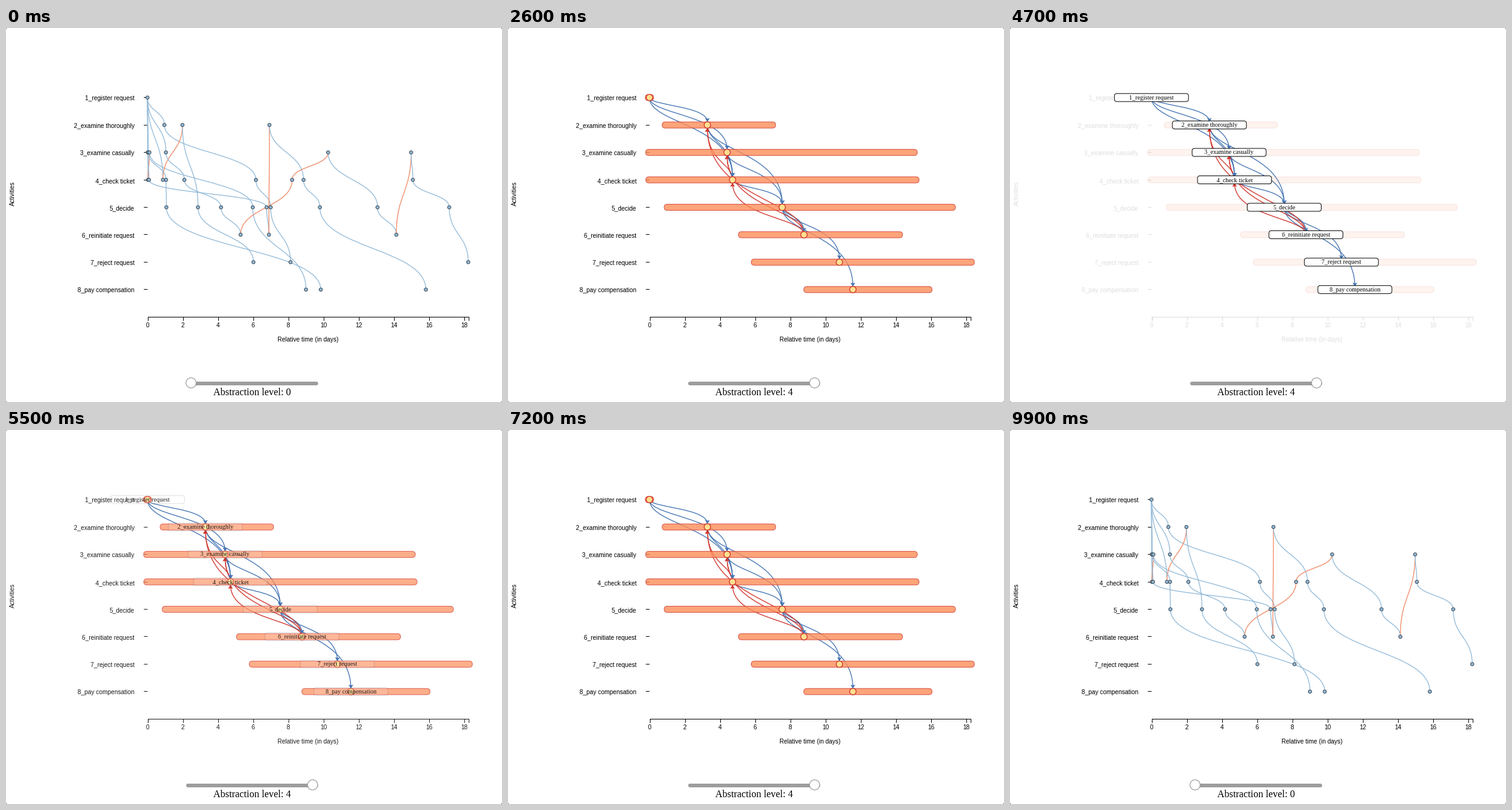
Animation of 804x606 px, one loop 10000 ms. Source, as a matplotlib script:

```python
import numpy as np
import matplotlib.pyplot as plt
from matplotlib.animation import FuncAnimation
from matplotlib.patches import Circle, FancyBboxPatch, PathPatch, Polygon
from matplotlib.path import Path

W, H, DPI = 804, 606, 100
PX = 72 / DPI
STEP, LOOP = 100, 10000

BLUE, RED = "#4575b4", "#d0342b"
ORANGE, YELLOW = "#fc8d59", "#fee090"

NAMES = ["1_register request", "2_examine thoroughly", "3_examine casually",
         "4_check ticket", "5_decide", "6_reinitiate request",
         "7_reject request", "8_pay compensation"]

# Each case is a list of (activity, day) events.
CASES = [
    [(1, 0), (2, .96), (4, 6.17), (5, 7.01), (7, 8.14)],
    [(1, 0), (4, .03), (3, .11), (5, 5.99), (8, 9.02)],
    [(1, 0), (3, .02), (4, .085), (5, 6.78), (6, 6.91), (2, 6.94),
     (4, 8.88), (5, 9.81), (8, 15.84)],
    [(1, 0), (4, .88), (2, 1.99), (5, 2.875), (7, 6.03)],
    [(1, 0), (3, 1.05), (4, 2.1), (5, 4.185), (6, 5.3), (4, 8.23), (3, 10.28),
     (5, 13.09), (6, 14.16), (3, 15.0), (4, 15.1), (5, 17.17), (7, 18.25)],
    [(1, 0), (3, .044), (4, 1.056), (5, 1.076), (8, 9.86)],
]

# Per level: activity -> range of days that is merged into one node.
MERGED = [
    {},
    {3: (0, .5), 4: (0, 1.5), 5: (5.5, 7.5)},
    {1: (0, 0), 2: (0, 3), 3: (0, 2), 4: (0, 9), 5: (0, 10), 6: (0, 8), 7: (0, 9)},
    {1: (0, 0), 2: (0, 3), 3: (0, 11), 4: (0, 20), 5: (0, 20), 6: (0, 8),
     7: (0, 9), 8: (0, 10)},
    {a: (0, 20) for a in range(1, 9)},
]

# Start time in ms of each abstraction level.
LEVEL_TIMES = [(0, 0), (600, 1), (1300, 2), (1900, 3), (2600, 4),
               (7500, 3), (8100, 2), (8800, 1), (9400, 0)]

# The small surplus keeps the pixel size from being rounded down.
fig = plt.figure(figsize=((W + .01) / DPI, (H + .01) / DPI), dpi=DPI,
                 facecolor="white")
ax = fig.add_axes([0, 0, 1, 1])
ax.set_xlim(0, W)
ax.set_ylim(H, 0)
ax.axis("off")


def day_x(day):
    return 229.3 + 28.49 * day


def row_y(activity):
    return 112.7 + 44.45 * (activity - 1)


def ease(u):
    u = min(max(u, 0), 1)
    return 4 * u ** 3 if u < .5 else 1 - 4 * (1 - u) ** 3


def label(x, y, text, size=10, font="Liberation Sans", ha="center", **kw):
    return ax.text(x, y, text, fontsize=size * PX, family=font, ha=ha,
                   va=kw.pop("va", "baseline"), color="black", **kw)


def line(xs, ys):
    return ax.plot(xs, ys, color="black", lw=PX, zorder=1,
                   solid_capstyle="butt")[0]


def rounded(x0, y0, x1, y1, r, **kw):
    return ax.add_patch(FancyBboxPatch(
        (x0, y0), x1 - x0, y1 - y0,
        boxstyle=f"round,pad=0,rounding_size={r}", **kw))


def curve(p, q, bend, color, lw, alpha=1):
    (x0, y0), (x1, y1) = p, q
    ym = y0 + (y1 - y0) * bend
    path = Path([(x0, y0), (x0, ym), (x1, ym), (x1, y1)],
                [Path.MOVETO] + [Path.CURVE4] * 3)
    return ax.add_patch(PathPatch(path, fc="none", ec=color, lw=lw * PX,
                                  alpha=alpha, zorder=2))


def arrow(p, q, color):
    way = 1 if q[1] > p[1] else -1
    x, tip = q[0], q[1] - way * 5
    base = tip - way * 6
    head = Polygon([(x, tip), (x - 3.8, base), (x, base + way * .8),
                    (x + 3.8, base)], fc=color, ec="none", zorder=2.5)
    return [curve(p, (x, tip), 1 / 3, color, 1.3), ax.add_patch(head)]


def dot(p, r, fill, edge, lw, alpha=1):
    return ax.add_patch(Circle(p, r, fc=fill, ec=edge, lw=lw * PX,
                               alpha=alpha, zorder=4))


def build_level(level):
    """Draw one abstraction level; return (all artists, bars, merged nodes)."""
    ranges = MERGED[level]
    fade = level >= 2
    groups, singles, edges = {}, set(), {}
    for case in CASES:
        for act, day in case:
            lo, hi = ranges.get(act, (1, 0))
            if lo <= day <= hi:
                groups.setdefault(act, []).append(day)
            else:
                singles.add((act, day))

    def place(event):
        act, day = event
        merged = event not in singles
        mean = np.mean(groups[act]) if merged else day
        return (day_x(mean), row_y(act)), merged

    for case in CASES:
        for a, b in zip(case, case[1:]):
            (p, pm), (q, qm) = place(a), place(b)
            if p != q:
                edges[p, q] = pm or qm

    artists, bars, nodes = [], [], []
    for (p, q), strong in edges.items():
        up = q[1] < p[1]
        if strong:
            artists += arrow(p, q, RED if up else BLUE)
        else:
            artists.append(curve(p, q, .5, "#f08a66" if up else "#94bbd9", 1.3,
                                 .45 if fade else 1))
    for act, day in sorted(singles):
        artists.append(dot((day_x(day), row_y(act)), 2.7, "#8fb8d6", "#3f4a55",
                           1, .5 if fade else 1))
    for act, days in groups.items():
        y = row_y(act)
        bars.append(rounded(day_x(min(days)) - 6.8, y - 5, day_x(max(days)) + 6.8,
                            y + 5, 5, fc=ORANGE, ec=RED, lw=PX, alpha=.8, zorder=3))
        nodes.append(dot((day_x(np.mean(days)), y), 5.2, YELLOW, RED, 1.3))
    return artists + bars + nodes, bars, nodes


# Chart frame
frame_parts = [label(11, 268.5, "Activities", rotation=90, va="center"),
               label(489, 508, "Relative time (in days)")]
for act, name in enumerate(NAMES, 1):
    y = row_y(act)
    frame_parts.append(label(208.3, y + 4.6, name, ha="right"))
    frame_parts.append(line([223, 229], [np.floor(y) + .5] * 2))
frame_parts.append(line([229.5, 229.5, 749.5, 749.5], [474, 468.5, 468.5, 474]))
for day in range(0, 19, 2):
    x = np.floor(day_x(day)) + .5
    frame_parts.append(line([x, x], [468.5, 474]))
    frame_parts.append(label(x, 485, str(day)))

levels = [build_level(n) for n in range(5)]

# Name boxes over the merged nodes
boxes, box_texts = [], []
for act, name in enumerate(NAMES, 1):
    days = [d for case in CASES for a, d in case if a == act]
    x, y = day_x(np.mean(days)), row_y(act)
    boxes.append(rounded(x - 60, y - 6.5, x + 60, y + 6.5, 4, fc="white",
                         ec="black", lw=PX, zorder=6))
    box_texts.append(label(x, y + 2.8, name, font="Liberation Serif", zorder=7))

# Slider
rounded(292, 573, 506, 579, 3, fc="#9d9d9d", ec="none", zorder=1)
knob = ax.add_patch(Circle((300, 575), 8.2, fc="white", ec="#8c8c8c", lw=PX,
                           zorder=5))
caption = label(399, 595, "", size=16, font="Liberation Serif", zorder=6)

# Window corners
for cx in (0, W):
    for cy in (0, H):
        sx, sy = (1 if cx == 0 else -1), (1 if cy == 0 else -1)
        ax.add_patch(Polygon([(cx, cy), (cx + 2 * sx, cy), (cx, cy + 2 * sy)],
                             fc="#8a8a8a", ec="none"))


def update(i):
    t = i * STEP
    level = [n for start, n in LEVEL_TIMES if start <= t][-1]
    for n, (artists, _, _) in enumerate(levels):
        for artist in artists:
            artist.set_visible(n == level)

    shown = ease((t - 4300) / 500)
    box_alpha = shown - ease((t - 5200) / 440)
    text_alpha = shown - ease((t - 5200) / 900)
    back = 1 - .9 * box_alpha
    for artist in frame_parts:
        artist.set_alpha(back)
    _, bars, nodes = levels[4]
    for bar in bars:
        bar.set_alpha(.8 * back)
    for node in nodes:
        node.set_alpha(back)
    for group, alpha in ((boxes, box_alpha), (box_texts, text_alpha)):
        for artist in group:
            artist.set_alpha(alpha)
            artist.set_visible(alpha > 0)

    knob.center = (300 + 49.25 * level, 575)
    caption.set_text(f"Abstraction level: {level}")
    return []


anim = FuncAnimation(fig, update, frames=LOOP // STEP, interval=STEP,
                     init_func=lambda: update(0), repeat=True, repeat_delay=0)
plt.show()
```
